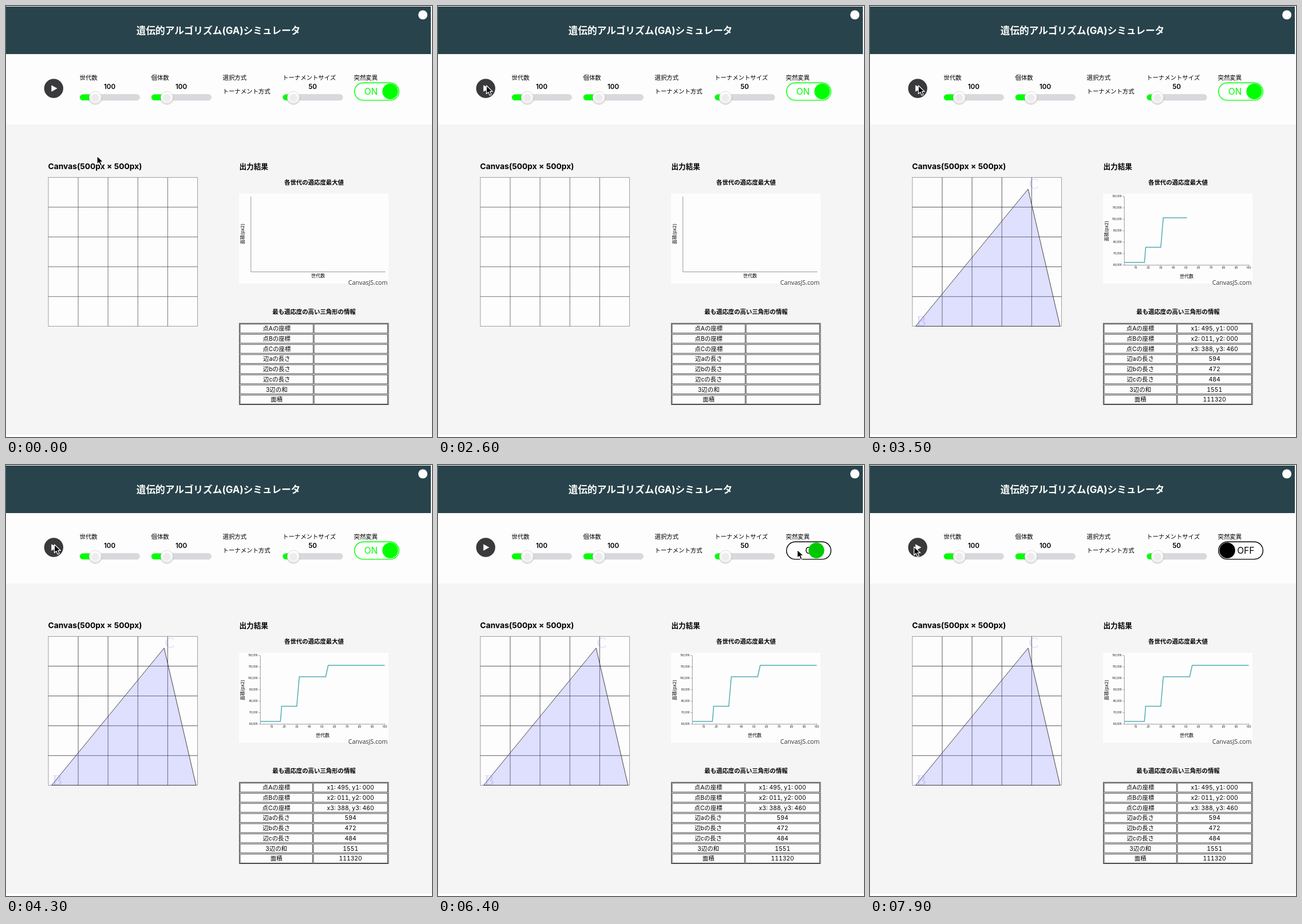
Recreate the animation shown at these times as an HTML page. Size 744 px wide and 753 px high, loop 8 s.

```html
<!DOCTYPE html>
<html lang="ja">
<head>
<meta charset="utf-8">
<title>遺伝的アルゴリズム(GA)シミュレータ</title>
<style>
html, body { margin: 0; width: 100%; height: 100%; overflow: hidden; background: #fff; }
svg { display: block; width: 744px; height: 753px; }
text { font-family: Inter, "Noto Sans CJK JP", "Noto Sans CJK", sans-serif; }
.num { font-feature-settings: "tnum"; }
</style>
</head>
<body>
<svg id="stage" viewBox="0 0 744 753" xmlns="http://www.w3.org/2000/svg">
  <defs>
    <linearGradient id="knob" x1="0" y1="0" x2="0" y2="1">
      <stop offset="0" stop-color="#fff"/><stop offset="1" stop-color="#f0f0f0"/>
    </linearGradient>
    <clipPath id="reveal"><rect id="revealBox" x="444" y="330" width="0" height="125"/></clipPath>
    <clipPath id="board"><rect x="74" y="299" width="261" height="261"/></clipPath>
  </defs>
</svg>
<script>
const LOOP = 8000, RESULT = 2800, DRAW_START = 2900, DRAW_END = 4100, TOGGLE = 6340;
const stage = document.getElementById("stage");

function add(parent, tag, attrs = {}, content) {
  const node = document.createElementNS("http://www.w3.org/2000/svg", tag);
  for (const key in attrs) node.setAttribute(key, attrs[key]);
  if (content !== undefined) node.textContent = content;
  parent.append(node);
  return node;
}
const rect = (p, x, y, width, height, attrs) => add(p, "rect", { x, y, width, height, ...attrs });
const circle = (p, cx, cy, r, attrs) => add(p, "circle", { cx, cy, r, ...attrs });
const path = (p, d, stroke, width = 1) =>
  add(p, "path", { d, stroke, "stroke-width": width, fill: "none" });
const label = (p, x, y, size, str, attrs) =>
  add(p, "text", { x, y, "font-size": size, fill: "#000", ...attrs }, str);
const middle = { "text-anchor": "middle" };
const bold = { "font-weight": 700 };

// Page bands
rect(stage, 0, 1, 742, 83, { fill: "#28434b" });
rect(stage, 0, 84, 744, 123, { fill: "#fdfdfd" });
rect(stage, 0, 207, 744, 542, { fill: "#f5f5f5" });
label(stage, 371, 49, 16.7, "遺伝的アルゴリズム(GA)シミュレータ", { ...middle, ...bold, fill: "#fff" });
circle(stage, 728, 15.5, 8, { fill: "#fff" });

// Controls
circle(stage, 83.3, 144, 16.7, { fill: "#3a3a3c" });
add(stage, "path", { d: "M79.3 138.2L89.6 144L79.3 149.8Z", fill: "#fff" });

function slider(x, knobX, name, value) {
  label(stage, x - 0.5, 129, 10.4, name);
  label(stage, x + 52, 145.4, 11.6, value, { ...middle, "font-weight": 600 });
  rect(stage, x, 154.4, 104.5, 10.4, { rx: 5.2, fill: "#d9d9dd", stroke: "#c9c9cd", "stroke-width": .6 });
  rect(stage, x, 154.4, knobX - x, 10.4, { rx: 5.2, fill: "#0f0" });
  circle(stage, knobX, 161, 11.8, { fill: "#000", opacity: .12 });
  circle(stage, knobX, 160, 10.8, { fill: "url(#knob)", stroke: "#d0d0d0", "stroke-width": .7 });
  circle(stage, knobX, 160, 6.5, { fill: "#ececee" });
}
slider(129, 156, "世代数", "100");
slider(254, 281, "個体数", "100");
slider(483.5, 502, "トーナメントサイズ", "50");
label(stage, 378.5, 129, 10.4, "選択方式");
label(stage, 378.5, 153, 10.4, "トーナメント方式");
label(stage, 607.5, 129, 10.4, "突然変異");
const pill = rect(stage, 608.7, 134.2, 77.6, 30.4, { rx: 15.2, fill: "#fff", "stroke-width": 1.4 });
const pillText = label(stage, 637.5, 155.3, 15.5, "ON", middle);
const pillDot = circle(stage, 671, 149.3, 13.7);

// Board
label(stage, 73.5, 284.5, 13.8, "Canvas(500px × 500px)", bold);
const STEP = 52.1;
let gridPath = "";
for (let i = 1; i < 5; i++) {
  const d = i * STEP;
  gridPath += `M${74 + d} 299.5V559.5M74 ${299.3 + d}H334.5`;
}
rect(stage, 74, 299.5, 260.5, 260, { fill: "#fdfdfd", stroke: "#888", "stroke-width": .8 });
const grid = path(stage, gridPath, "#555", .8);

const triangle = add(stage, "g", { "clip-path": "url(#board)" });
const corners = [[495, 0], [11, 0], [388, 460]].map(([x, y]) => [74 + x * .521, 559.5 - y * .521]);
add(triangle, "polygon", {
  points: corners.join(" "), fill: "#8888ff", "fill-opacity": .26, stroke: "#333", "stroke-width": .9
});
["A", "B", "C"].forEach((name, i) => label(triangle, corners[i][0] + 1.5, corners[i][1] - 1, 25, name,
  { fill: "#8888ff", opacity: .3, style: "font-family:'Liberation Serif',serif" }));

// Chart
label(stage, 407.5, 284.5, 12.6, "出力結果", bold);
label(stage, 538, 312, 10.4, "各世代の適応度最大値", { ...middle, ...bold });
rect(stage, 407, 328, 261, 157, { fill: "#fdfdfd" });

function axes(left, bottom, titleX, titleY, sideY) {
  const g = add(stage, "g");
  path(g, `M${left} 333V${bottom}H662.5`, "#8d8d88", .9);
  label(g, titleX, titleY, 8, "世代数", middle);
  label(g, 0, 0, 8, "面積(px2)", { ...middle, transform: `translate(416 ${sideY}) rotate(-90)` });
  return g;
}
const emptyChart = axes(427.7, 464.5, 545, 474.3, 398);
const fullChart = axes(444.2, 452.8, 553, 474.5, 393);
const chartX = n => 442 + n * 2.195;
const chartY = v => 452.6 - (v - 60) * 2;
for (let v = 60; v <= 120; v += 10) {
  path(fullChart, `M441.5 ${chartY(v)}H444`, "#888", .8);
  label(fullChart, 439.5, chartY(v) + 1.5, 4.4, v + ",000", { "text-anchor": "end" });
}
for (let n = 10; n <= 100; n += 10) {
  path(fullChart, `M${chartX(n)} 452.8v2`, "#888", .8);
  label(fullChart, chartX(n), 458.8, 4.4, n, middle);
}
const best = [[1, 62.3], [17, 62.3], [18, 75.5], [30, 75.5], [32, 101.3], [53, 101.3], [55, 111.3], [100, 111.3]];
const curve = path(fullChart, "M" + best.map(([n, v]) => `${chartX(n)} ${chartY(v)}`).join("L"), "#52adb5", 1.5);
curve.setAttribute("clip-path", "url(#reveal)");
label(stage, 666.5, 487, 10.7, "CanvasJS.com",
  { "text-anchor": "end", fill: "#333", style: "font-family:'Open Sans',sans-serif" });

// Result table
label(stage, 538, 538, 10.4, "最も適応度の高い三角形の情報", { ...middle, ...bold });
const rows = [
  ["点Aの座標", "x1: 495, y1: 000"], ["点Bの座標", "x2: 011, y2: 000"], ["点Cの座標", "x3: 388, y3: 460"],
  ["辺aの長さ", "594"], ["辺bの長さ", "472"], ["辺cの長さ", "484"], ["3辺の和", "1551"], ["面積", "111320"]
];
function table(split, filled) {
  const g = add(stage, "g");
  const line = { fill: "#fdfdfd", stroke: "#444", "stroke-width": 1 };
  rect(g, 407.5, 554.3, 260.5, 142.2, line);
  rows.forEach(([name, value], i) => {
    const y = 555.8 + i * 17.72;
    rect(g, 409, y, split - 409, 15.6, line);
    rect(g, split + 1.7, y, 666.5 - split - 1.7, 15.6, line);
    label(g, (409 + split) / 2, y + 11.5, 10.4, name, middle);
    if (filled) label(g, (split + 668) / 2, y + 11.5, 10.4, value, { ...middle, class: "num" });
  });
  return g;
}
const emptyTable = table(536.5, false);
const fullTable = table(535.3, true);

const cursor = add(stage, "path", {
  d: "M0 0V14.5L3.4 11.4L5.8 17L8.6 15.8L6.2 10.4H10.8Z",
  fill: "#000", stroke: "#fff", "stroke-width": 1.2, "stroke-linejoin": "round"
});
const cursorKeys = [
  [0, 159, 262], [100, 159, 262], [750, 84.5, 139], [5050, 84.5, 139], [5600, 546, 163],
  [5900, 580, 162], [6200, 627.5, 148], [6450, 627.5, 148], [6800, 68, 150], [7100, 24, 155], [7550, 77, 143]
];

const clamp = v => Math.min(1, Math.max(0, v));
const smooth = v => v * v * (3 - 2 * v);
const show = (node, on) => node.setAttribute("visibility", on ? "visible" : "hidden");

function cursorAt(t) {
  const next = cursorKeys.findIndex(k => k[0] > t);
  if (next < 0) return cursorKeys.at(-1).slice(1);
  const [t0, x0, y0] = cursorKeys[next - 1], [t1, x1, y1] = cursorKeys[next];
  const k = smooth((t - t0) / (t1 - t0));
  return [x0 + (x1 - x0) * k, y0 + (y1 - y0) * k];
}

function render(t) {
  const done = t >= RESULT;
  for (const node of [triangle, fullChart, fullTable]) show(node, done);
  for (const node of [emptyChart, emptyTable]) show(node, !done);
  grid.setAttribute("stroke", done ? "#333" : "#555");
  const drawn = clamp((t - DRAW_START) / (DRAW_END - DRAW_START));
  document.getElementById("revealBox").setAttribute("width", 219 * drawn);

  const off = t >= TOGGLE;
  const moved = off ? smooth(clamp((t - TOGGLE + 30) / 300)) : 0;
  const ink = off ? "#000" : "#0f0";
  pill.setAttribute("stroke", ink);
  pillText.setAttribute("fill", ink);
  pillText.setAttribute("x", off ? 656.3 : 637.5);
  pillText.textContent = off ? "OFF" : "ON";
  pillDot.setAttribute("cx", 671 - 47 * moved);
  pillDot.setAttribute("fill", `rgb(0,${Math.round(255 * (1 - moved))},0)`);

  cursor.setAttribute("transform", `translate(${cursorAt(t)})`);
}

const start = performance.now();
function tick() {
  const t = (performance.now() - start) % LOOP;
  render(Math.floor(t / 100) * 100);
  requestAnimationFrame(tick);
}
tick();
</script>
</body>
</html>
```
